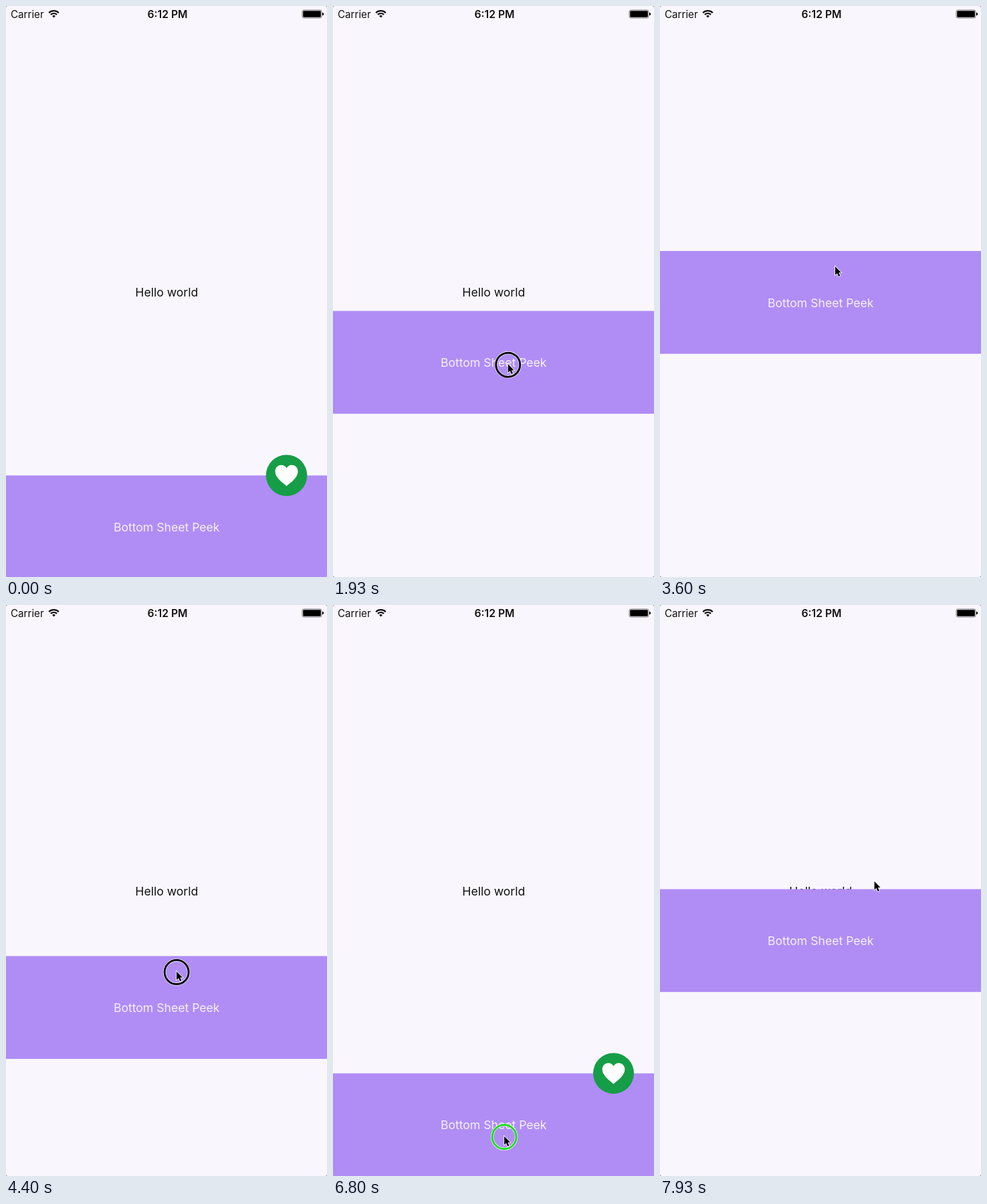
Recreate the animation shown at these times as an HTML page. Size 480 by 853 pixels, loop 8 s.

```html
<!DOCTYPE html>
<html lang="en">
<head>
<meta charset="utf-8">
<title>Bottom sheet</title>
<style>
  html, body { margin: 0; width: 100%; height: 100%; overflow: hidden; background: #8c8a90; }
  svg { display: block; width: 480px; height: 853px; border-radius: 3px; background: #f9f7fd; }
  text { font-family: Inter, Roboto, sans-serif; font-size: 17.6px; fill: #111; }
  .status { font-size: 15.2px; }
  .clock { font-size: 15.7px; font-weight: 600; }
</style>
</head>
<body>
<svg viewBox="0 0 480 853">
  <text class="status" x="7" y="17.5">Carrier</text>
  <g transform="translate(71.5 17.5)" fill="none" stroke="#111" stroke-width="2.2">
    <path d="M-7.3 -7.3A10.4 10.4 0 0 1 7.3 -7.3M-4.6 -4.6A6.5 6.5 0 0 1 4.6 -4.6"/>
    <path d="M0 0L-2.4 -2.6A3.5 3.5 0 0 1 2.4 -2.6Z" fill="#111" stroke="none"/>
  </g>
  <text class="clock" x="241.5" y="17.5" text-anchor="middle">6:12 PM</text>
  <rect x="443" y="6" width="29" height="12" rx="2.5" fill="none" stroke="#77757a"/>
  <rect x="444.2" y="7.2" width="26.6" height="9.6" rx="1.2"/>
  <path d="M473 9.8Q475.2 10 475.2 12T473 14.2Z"/>

  <text x="240.3" y="433.7" text-anchor="middle">Hello world</text>

  <g id="sheet">
    <rect width="480" height="153.6" fill="#b08df5"/>
    <text x="240.2" y="83.8" text-anchor="middle" style="fill:#f6f1fe">Bottom Sheet Peek</text>
    <g id="fab">
      <circle r="30.8" fill="#169d47"/>
      <path fill="#fff" d="M0 16C-6 10.5 -17 3.5 -17 -6C-17 -11.5 -13 -15.5 -8 -15.5C-4.5 -15.5 -1.5 -13.6 0 -11C1.5 -13.6 4.5 -15.5 8 -15.5C13 -15.5 17 -11.5 17 -6C17 3.5 6 10.5 0 16Z"/>
    </g>
  </g>

  <g id="cursor">
    <g id="ring" fill="none">
      <circle r="18" stroke="#fff" stroke-opacity=".75" stroke-width="4.4"/>
      <circle id="ringLine" r="18" stroke-width="2.8"/>
    </g>
    <path d="M0 -1V11.6L2.9 9L5 13.8L7.3 12.8L5.2 8.1H9Z" stroke="#fff" stroke-width="1.6" paint-order="stroke"/>
  </g>
</svg>
<script>
const LOOP = 8000, TICK = 1000 / 15, REST = 701.3, OPEN = 366;
const PRESS_FLASH = 140;
const ENTER = { t: TICK, x: 262, y: 835 }, EXIT = { t: LOOP, x: 321, y: 412 };

// Each drag: sheet path as [ms, top edge], and where the cursor holds the sheet.
const drags = [
  { release: 2600, grip: 80.5, x: [258, 263.5],
    path: [[550, REST], [1200, 563.5], [1930, 456], [2600, OPEN]] },
  { release: 5500, grip: 24, x: [262, 245],
    path: [[3650, OPEN], [5070, 666], [5200, 675], [5930, REST]] },
  { release: 7250, grip: 95, x: [256, 266],
    path: [[6795, REST], [7470, 478], [7930, 424.5]] }
];
for (const drag of drags) drag.press = drag.path[0][0];
const sheetPath = drags.flatMap(drag => drag.path);

const el = id => document.getElementById(id);
const sheet = el("sheet"), fab = el("fab"), cursor = el("cursor");
const ring = el("ring"), ringLine = el("ringLine");
const show = (node, on) => node.setAttribute("visibility", on ? "inherit" : "hidden");
const move = (node, x, y, scale = 1) =>
  node.setAttribute("transform", `translate(${x} ${y}) scale(${scale})`);

const mix = (a, b, u) => a + (b - a) * u;
const easeOut = u => 1 - (1 - u) ** 2;
const progress = (t, t0, t1) => Math.min(1, Math.max(0, (t - t0) / (t1 - t0)));

function sheetTop(t) {
  const next = sheetPath.findIndex(([time]) => time > t);
  if (next === 0) return REST;
  if (next < 0) return sheetPath.at(-1)[1];
  const [t0, y0] = sheetPath[next - 1], [t1, y1] = sheetPath[next];
  return mix(y0, y1, progress(t, t0, t1));
}

const held = (drag, t) => ({
  t,
  x: mix(...drag.x, progress(t, drag.press, drag.release)),
  y: sheetTop(t) + drag.grip
});

// Held during a drag, otherwise gliding from the last release to the next press.
function cursorAt(t) {
  const active = drags.find(drag => t >= drag.press && t < drag.release);
  if (active) return held(active, t);
  const last = drags.findLast(drag => drag.release <= t);
  const next = drags.find(drag => drag.press > t);
  const from = last ? held(last, last.release) : ENTER;
  const to = next ? held(next, next.press) : EXIT;
  const u = easeOut(progress(t, from.t, to.t));
  return { x: mix(from.x, to.x, u), y: mix(from.y, to.y, u) };
}

function draw(t) {
  const top = sheetTop(t), { x, y } = cursorAt(t);
  const fabScale = Math.max(0, 1 - 2 * (REST - top) / (REST - OPEN));
  const drag = drags.find(({ press, release }) => t >= press && t < release);

  move(sheet, 0, top);
  move(fab, 419.5, 0, fabScale);
  show(fab, fabScale > 0);
  move(cursor, x, y);
  show(cursor, t > TICK / 2);
  show(ring, drag);
  if (drag) ringLine.setAttribute("stroke", t - drag.press < PRESS_FLASH ? "#12e012" : "#000");
}

// The picture steps at 15 frames per second; the small lead absorbs timer rounding.
const start = performance.now();
function frame() {
  const t = performance.now() - start;
  draw(Math.floor((t + 8) / TICK) * TICK % LOOP);
  requestAnimationFrame(frame);
}
frame();
</script>
</body>
</html>
```
